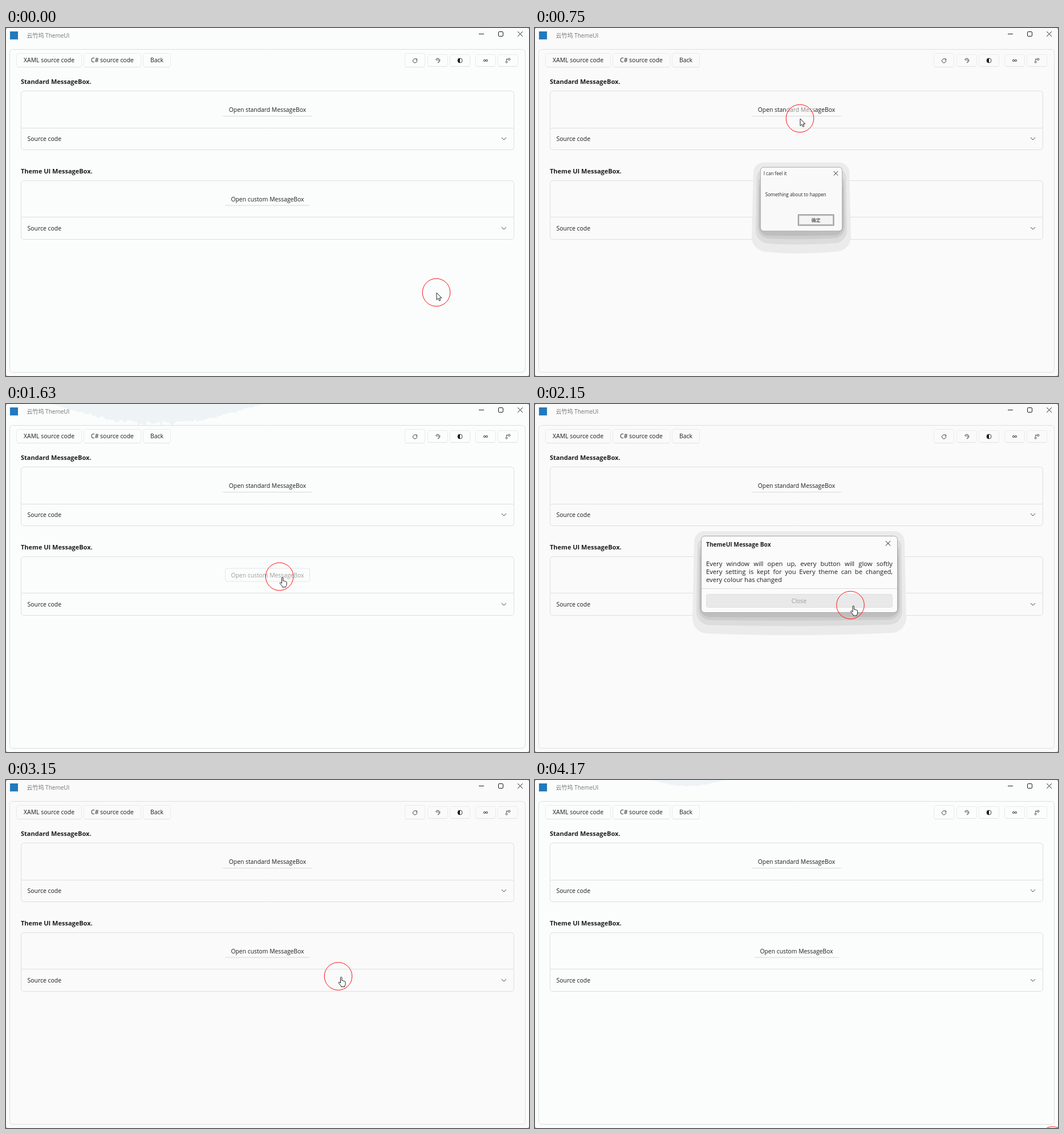
An HTML page with a canvas for the animation above (4.23 s loop, 917 by 610 pixels).

```html
<!DOCTYPE html>
<html lang="en">
<head>
<meta charset="utf-8">
<title>Message box demo</title>
<style>
html, body { margin: 0; width: 100%; height: 100%; overflow: hidden; background: #fafafa; }
canvas { display: block; }
</style>
</head>
<body>
<canvas id="stage" width="917" height="610"></canvas>
<script>
const LOOP = 4230;
const SANS = '"Open Sans", "Noto Sans", "Noto Sans CJK SC", sans-serif';
const INK = '#1d1d1d', SOFT = '#444', FADED = '#9c9c9c', EDGE = '#dddfde';
const MID = 458.5;

// pointer moves: when each starts and ends, and where it leads
const HOME = { x: 754.5, y: 463.5 };
const MOVES = [
  { from: 40, to: 310, x: 482, y: 111.5 },
  { from: 310, to: 490, x: 464, y: 146.5 },
  { from: 600, to: 700, x: 464.5, y: 158.5 },
  { from: 830, to: 1070, x: 495, y: 338 },
  { from: 1180, to: 1420, x: 479.5, y: 302.5 },
  { from: 1650, to: 1740, x: 472.5, y: 295.5 },
  { from: 1890, to: 2130, x: 553, y: 352.5 },
  { from: 2250, to: 2550, x: 588, y: 358.5 },
  { from: 2550, to: 2750, x: 582.5, y: 344 },
  { from: 3160, to: 3650, x: 886.5, y: 593.5 },
  { from: 3650, to: 4170, x: 907.5, y: 632 }
];

const ARROW = new Path2D('M.5 .5V13L3.4 10.3L5.3 14.6L7.3 13.7L5.5 9.6H9.3Z');
const HAND = new Path2D('M4 12V2.5A1.2 1.2 0 0 1 6.4 2.5V7.6Q8.5 6.8 8.7 8.3Q10.6 7.6 10.8 9' +
  'Q12.7 8.6 12.6 10.3V13.5Q12.4 16 11.2 17V18.5H5.2V17.2L1 12.2Q.2 10.4 1.8 10.2Q3 10.4 4 12Z');

const c = document.getElementById('stage').getContext('2d');
const between = (t, a, b) => t >= a && t < b;
const ramp = (t, a, b) => Math.min(1, Math.max(0, (t - a) / (b - a)));
const easeOut = k => 1 - (1 - k) ** 2;
const smooth = k => k * k * (3 - 2 * k);

function pointer(t) {
  return MOVES.reduce((p, m) => {
    const k = smooth(ramp(t, m.from, m.to));
    return { x: p.x + (m.x - p.x) * k, y: p.y + (m.y - p.y) * k };
  }, HOME);
}

function widthOf(s, size, weight = 400) {
  c.font = `${weight} ${size}px ${SANS}`;
  return c.measureText(s).width;
}

function text(s, x, y, { size = 10.45, color = INK, weight = 400, align = 'left' } = {}) {
  c.font = `${weight} ${size}px ${SANS}`;
  c.fillStyle = color;
  c.textAlign = align;
  c.fillText(s, x, y);
}

function justify(s, x, y, width, size) {
  const words = s.split(' ');
  const used = words.reduce((sum, w) => sum + widthOf(w, size), 0);
  const gap = (width - used) / (words.length - 1);
  for (const w of words) {
    text(w, x, y, { size });
    x += widthOf(w, size) + gap;
  }
}

function box(x, y, w, h, radius, fill, stroke) {
  c.beginPath();
  c.roundRect(x, y, w, h, radius);
  if (fill) { c.fillStyle = fill; c.fill(); }
  if (stroke) { c.strokeStyle = stroke; c.stroke(); }
}

function line(color, ...p) {
  c.beginPath();
  for (let i = 0; i < p.length; i += 2) c.lineTo(p[i], p[i + 1]);
  c.strokeStyle = color;
  c.stroke();
}

function cross(x, y, r) {
  line(INK, x - r, y - r, x + r, y + r);
  line(INK, x - r, y + r, x + r, y - r);
}

function arc(x, y, r, a = 0, b = 2 * Math.PI, color = SOFT) {
  c.beginPath();
  c.arc(x, y, r, a, b);
  c.strokeStyle = color;
  c.stroke();
}

// wallpaper showing faintly through the title bar, with a ragged lower edge
function cloud(left, right, depth) {
  c.beginPath();
  c.moveTo(left, 0);
  for (let x = left, seed = 7; x <= right; x += 4) {
    seed = seed * 16807 % 2147483647;
    const arch = Math.sin(Math.PI * (x - left) / (right - left));
    c.lineTo(x, depth * arch * (0.8 + 0.3 * seed / 2147483647));
  }
  c.lineTo(right, 0);
  c.fillStyle = '#eef3f6';
  c.fill();
}

function titleBar() {
  c.fillStyle = '#2279bd';
  c.fillRect(7, 6, 14, 14);
  text('云竹坞 ThemeUI', 36.5, 16.5, { size: 10, color: '#757575' });
  line(INK, 829, 10.5, 838, 10.5);
  box(863.5, 6.5, 8, 8, 1.5, null, INK);
  cross(901.5, 10.5, 4.3);
}

function toolButton(x, y, w, h) {
  box(x, y, w, h, 3, null, '#e9ebea');
  line('#dfe1e0', x + 2, y + h, x + w - 2, y + h);
}

// each icon is drawn around its own centre
const ICONS = [
  () => { arc(0, 0.5, 3.5, -0.6, 5); line(SOFT, 0.5, -3, 3.5, -3, 3.5, -0.5); },
  () => { arc(0, 0, 3.8, -2.7, 1.6); arc(0.5, 0, 1.6, -2.7, 1.6); line(SOFT, -3.5, -1.5, -1, -0.5); },
  () => {
    arc(0, 0, 4);
    c.beginPath();
    c.arc(0, 0, 4, Math.PI / 2, Math.PI * 1.5);
    c.fillStyle = INK;
    c.fill();
  },
  () => { arc(-2, 0, 1.6); arc(2, 0, 1.6); },
  () => { arc(2.2, -2.2, 1.7); arc(-2.4, 2.6, 1.5); line(SOFT, -2.5, 0, -2.5, -2.5, 0, -2.5); }
];

function toolbar() {
  let x = 18.5;
  for (const label of ['XAML source code', 'C# source code', 'Back']) {
    const w = Math.round(widthOf(label, 10.45)) + 25;
    toolButton(x, 44.5, w, 24);
    text(label, x + w / 2, 60, { align: 'center' });
    x += w + 4;
  }
  ICONS.forEach((icon, i) => {
    const mid = Math.round(717 + 39.5 * i + (i > 2 ? 5 : 0));
    const tall = i ? 0 : 1;
    toolButton(mid - 17.5, 46.5 - 2 * tall, 35, 21 + 3 * tall);
    c.save();
    c.translate(mid, 57);
    icon();
    c.restore();
  });
}

function card(title, top, split) {
  text(title, 26, top - 12.5, { size: 11, weight: 700 });
  box(26.5, top, 864, 103, 5, null, EDGE);
  line(EDGE, 26.5, split, 890.5, split);
  text('Source code', 37.5, top + 87.5);
  const y = top + 83.5;
  line(SOFT, 869, y - 2, 873, y + 2, 877, y - 2);
}

function linkButton(label, top, state) {
  const size = 10.35;
  const half = Math.round(widthOf(label, size) / 2) + 10;
  if (state === 'rest') line('#d6d8d7', MID - half, top + 23, MID + half, top + 23);
  else box(MID - half, top, 2 * half, 23, 3, state === 'hover' ? '#f6f8f7' : null, '#e4e6e5');
  text(label, MID, top + 15.5, { size, color: state === 'down' ? FADED : INK, align: 'center' });
}

// stepped shadow: every band is smaller and darker, wider and bowed at the foot
function shadow(x, y, w, h) {
  for (let i = 0; i < 4; i++) {
    const side = 16 * 0.55 ** i, drop = 39 * 0.6 ** i;
    const l = x - side, r = x + w + side, top = y - 8.5 + 12 * i, foot = y + h + drop;
    const inset = side * 0.25, round = 18 - 3 * i, bow = drop * 0.1;
    c.beginPath();
    c.moveTo(MID, top);
    c.arcTo(r - inset, top, r, foot - bow, round);
    c.arcTo(r, foot - bow, MID, foot, round + 8);
    c.quadraticCurveTo(MID, foot + bow, l + round + 8, foot - bow * 0.6);
    c.arcTo(l, foot - bow, l + inset, top, round + 8);
    c.arcTo(l + inset, top, MID, top, round);
    c.closePath();
    const shade = 235 - 15 * i;
    c.fillStyle = `rgb(${shade}, ${shade}, ${shade})`;
    c.fill();
  }
}

// a dialog that scales and fades around its centre
function dialog(x, y, w, h, scale, alpha, content) {
  c.save();
  c.globalAlpha = alpha;
  c.translate(x + w / 2, y + h / 2);
  c.scale(scale, scale);
  c.translate(-x - w / 2, -y - h / 2);
  shadow(x, y, w, h);
  box(x, y, w, h, 6, '#fbfbfb', '#a5a5a5');
  content();
  c.restore();
}

function systemBox(t) {
  if (!between(t, 690, 1260)) return;
  const open = easeOut(ramp(t, 690, 850)), shut = ramp(t, 1130, 1260);
  const scale = 0.86 + 0.21 * open - 0.1 * shut;
  dialog(394.5, 243.5, 145, 113, scale, Math.min(1, 0.5 + 0.75 * open) * (1 - shut), () => {
    text('I can feel it', 400, 258, { size: 8.2 });
    cross(528, 254.3, 3.8);
    text('Something about to happen', 403, 295, { size: 8.27 });
    box(461.5, 327.5, 63, 19, 0, '#f4f4f4', '#606060');
    box(463, 329, 60, 16, 0, null, '#b4b4b4');
    text('确定', 493, 340, { size: 8, weight: 500, align: 'center' });
  });
}

function themeBox(t) {
  if (!between(t, 1890, 3150)) return;
  const open = easeOut(ramp(t, 1890, 2020)), shut = ramp(t, 3080, 3150);
  const scale = 0.92 + 0.08 * open - 0.06 * shut;
  dialog(291.5, 231.5, 344, 134, scale, Math.min(1, 0.4 + open) * (1 - shut), () => {
    text('ThemeUI Message Box', 300, 250, { size: 10.2, weight: 700 });
    cross(619, 244.3, 4.2);
    justify('Every window will open up, every button will glow softly', 300, 284, 327, 11.2);
    justify('Every setting is kept for you Every theme can be changed,', 300, 297.5, 327, 11.2);
    text('every colour has changed', 300, 311.5, { size: 11.2 });
    line('#dcdcdc', 292, 323.5, 635, 323.5);

    const down = between(t, 2090, 2400) || t >= 3000;
    const hover = between(t, 2650, 3000);
    box(300.5, 333.5, 326, 23, 3, down ? '#e9e9e9' : hover ? '#f5f5f5' : null, '#e0e0e0');
    text('Close', 463, 349, { color: down ? FADED : INK, align: 'center' });
  });
}

function cursor(t) {
  const { x, y } = pointer(t);
  const hand = between(t, 430, 690) || between(t, 1370, 2360) || between(t, 2640, 3220);
  const shape = hand ? HAND : ARROW;
  arc(x, y, 24.3, 0, 2 * Math.PI, '#ff1010');
  c.save();
  c.translate(x, y);
  c.fillStyle = '#fff';
  c.fill(shape);
  c.strokeStyle = '#222';
  c.stroke(shape);
  c.restore();
}

const buttonState = (t, hover, press, release) =>
  between(t, press, release) ? 'down' : between(t, hover, press) ? 'hover' : 'rest';

function draw(t) {
  const active = t < 700 || between(t, 1150, 1900) || t >= 3200;
  const back = active ? '#fbfdfc' : '#fafafa';
  c.lineWidth = 1;
  c.fillStyle = '#7d8896';
  c.fillRect(0, 0, 917, 610);
  box(0, 0, 917, 610, 3, back);
  if (between(t, 1200, 1900)) cloud(80, 450, 36);
  if (t >= 3700) cloud(205, 331, 11);
  box(6.5, 37.5, 904, 566, 5, back, EDGE);
  titleBar();
  toolbar();

  card('Standard MessageBox.', 110.5, 175.5);
  linkButton('Open standard MessageBox', 131.5, buttonState(t, 430, 600, 690));
  if (between(t, 690, 1130)) {
    // part of the label is still pale from the press
    c.globalAlpha = 0.5;
    c.fillStyle = back;
    c.fillRect(440, 134, 49, 16);
    c.globalAlpha = 1;
  }
  card('Theme UI MessageBox.', 267.5, 331.5);
  linkButton('Open custom MessageBox', 288, buttonState(t, 1400, 1550, 3100));

  systemBox(t);
  themeBox(t);
  cursor(t);
}

const start = performance.now();
function tick() {
  draw((performance.now() - start) % LOOP);
  requestAnimationFrame(tick);
}
tick();
</script>
</body>
</html>
```
